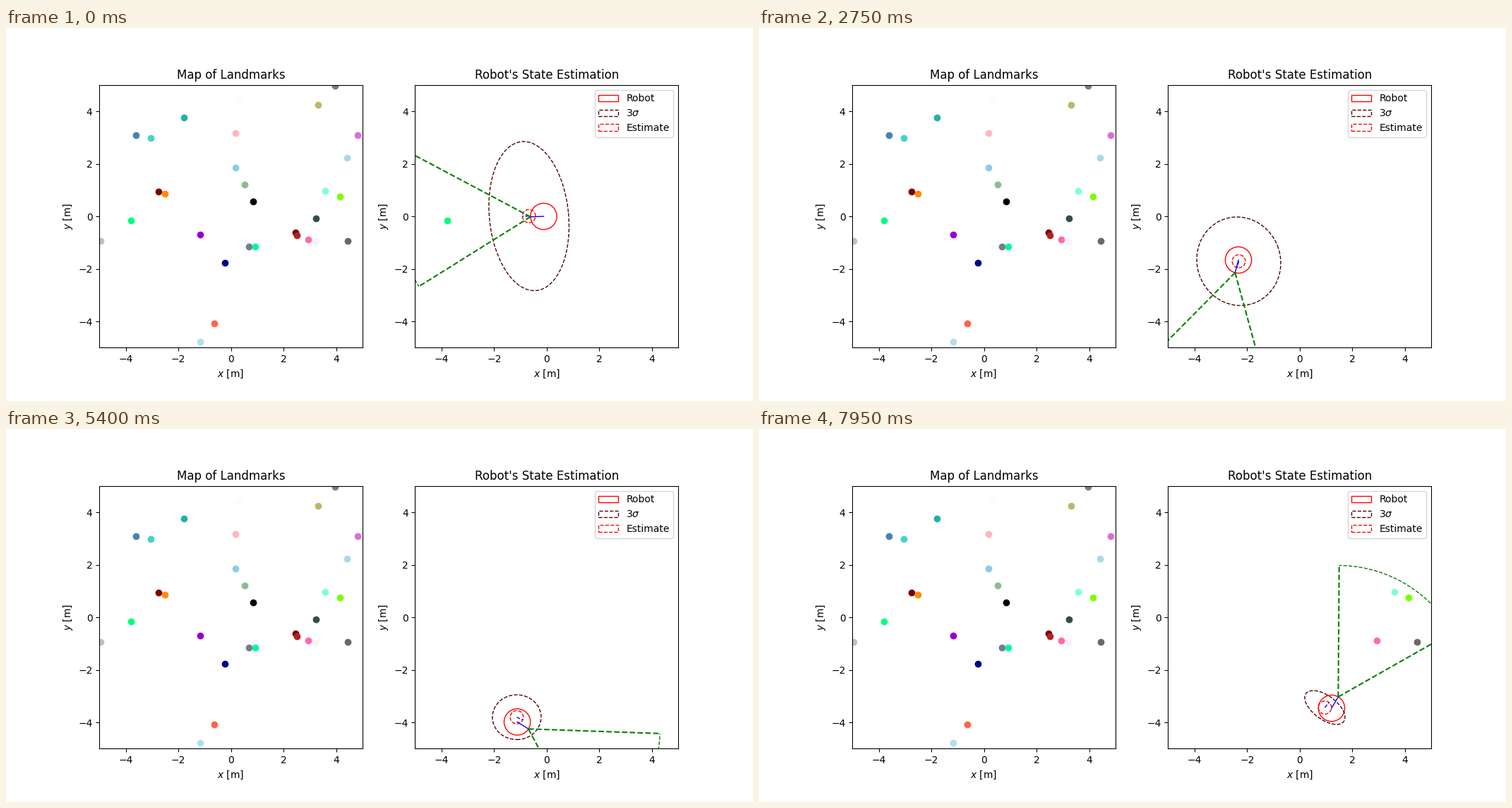
Write a matplotlib script that moves like this. It is 1058x529 px and loops after 8 s.

```python
import numpy as np
import matplotlib.pyplot as plt
from matplotlib.animation import FuncAnimation
from matplotlib.patches import Circle, Ellipse

FRAMES, INTERVAL = 160, 50
RADIUS, EST_RADIUS = 0.5, 0.25
HALF_FOV, FOV_RANGE, DETECT_RANGE = np.radians(30), 5.0, 4.7
SPEED = 0.0525  # metres per frame

LANDMARKS = [
    ("steelblue", -3.62, 3.09), ("mediumturquoise", -3.05, 2.97),
    ("lightseagreen", -1.80, 3.77), ("snow", 0.31, 4.43),
    ("lightpink", 0.17, 3.16), ("skyblue", 0.17, 1.86),
    ("darkseagreen", 0.52, 1.22), ("black", 0.83, 0.57),
    ("maroon", -2.74, 0.93), ("darkorange", -2.51, 0.86),
    ("springgreen", -3.79, -0.15), ("silver", -4.94, -0.93),
    ("darkviolet", -1.16, -0.69), ("slategray", 0.69, -1.15),
    ("mediumspringgreen", 0.92, -1.15), ("navy", -0.23, -1.77),
    ("tomato", -0.62, -4.07), ("powderblue", -1.18, -4.77),
    ("slategray", 3.95, 4.98), ("darkkhaki", 3.31, 4.24),
    ("orchid", 4.81, 3.09), ("lightblue", 4.42, 2.22),
    ("aquamarine", 3.59, 0.96), ("lawngreen", 4.14, 0.75),
    ("darkslategray", 3.24, -0.08), ("maroon", 2.46, -0.60),
    ("firebrick", 2.51, -0.72), ("hotpink", 2.93, -0.87),
    ("lavenderblush", 3.20, -0.96), ("dimgray", 4.45, -0.93),
]
DETECTABLE = {"springgreen", "tomato", "aquamarine", "lawngreen",
              "hotpink", "dimgray"}

# Waypoints: frame and true pose (x, y, heading in degrees)
STEPS = np.array([0, 33, 55, 86, 108, 137, 159])
ROBOT = np.array([
    (-0.117, 0.0, 182), (-1.753, -0.64, 227.2), (-2.33, -1.66, 255.3),
    (-2.01, -3.19, 307), (-1.12, -3.98, 328), (0.393, -4.17, 377.5),
    (1.21, -3.457, 419.6),
])
# Estimated pose at the same waypoints
ESTIMATE = np.array([
    (-0.675, 0.01, 181), (-1.775, -0.769, 227), (-2.317, -1.708, 256),
    (-2.04, -3.122, 307), (-1.139, -3.798, 335), (0.218, -4.007, 373),
    (0.956, -3.43, 410),
])
# Three-sigma half extents in x and y, and their correlation
SPREAD = np.array([
    (1.523, 2.837, -0.132), (0.865, 1.496, 0.165), (1.596, 1.684, -0.04),
    (0.973, 0.872, 0.28), (0.926, 0.852, 0.0), (1.12, 1.395, -0.14),
    (0.765, 0.644, -0.58),
])


def direction(angle):
    return np.array([np.cos(angle), np.sin(angle)])


def hermite(keys, slopes, frame):
    i = min(np.searchsorted(STEPS, frame, side="right") - 1, len(STEPS) - 2)
    span = STEPS[i + 1] - STEPS[i]
    u = (frame - STEPS[i]) / span
    return ((1 + 2 * u) * (1 - u) ** 2 * keys[i]
            + u * (1 - u) ** 2 * span * slopes[i]
            + u * u * (3 - 2 * u) * keys[i + 1]
            + u * u * (u - 1) * span * slopes[i + 1])


def linear(keys, frame):
    return np.array([np.interp(frame, STEPS, col) for col in keys.T])


ROBOT_SLOPES = np.gradient(ROBOT, STEPS, axis=0)
ROBOT_SLOPES[:, :2] = SPEED * direction(np.radians(ROBOT[:, 2])).T


def setup(ax, title):
    ax.set_aspect("equal")
    ax.set(xlim=(-5, 5), ylim=(-5, 5), title=title,
           xlabel="$x$ [m]", ylabel="$y$ [m]")


def dot(ax, color, x, y):
    return ax.plot([x], [y], "o", color=color, zorder=1.5)[0]


fig, (ax_map, ax_est) = plt.subplots(
    1, 2, figsize=(10.58 + 1e-6, 5.29 + 1e-6), dpi=100)
setup(ax_map, "Map of Landmarks")
setup(ax_est, "Robot's State Estimation")

for mark in LANDMARKS:
    dot(ax_map, *mark)
sightings = [(dot(ax_est, *mark), np.array(mark[1:]))
             for mark in LANDMARKS if mark[0] in DETECTABLE]

body = Circle((0, 0), RADIUS, fill=False, ec="red", label="Robot")
ellipse = Ellipse((0, 0), 1, 1, fill=False, ec="#500000", ls="--",
                  label=r"3$\sigma$")
est_body = Circle((0, 0), EST_RADIUS, fill=False, ec="red", ls="--",
                  label="Estimate")
for patch in (body, ellipse, est_body):
    ax_est.add_patch(patch)
nose, = ax_est.plot([], [], "b-", lw=1)
est_nose, = ax_est.plot([], [], "b--", lw=1)
rays = [ax_est.plot([], [], "--", color="green", lw=1.5)[0] for _ in range(2)]
arc, = ax_est.plot([], [], "--", color="green", lw=1)
ax_est.legend(handles=[body, ellipse, est_body], loc="upper right")


def segment(line, start, end):
    line.set_data([start[0], end[0]], [start[1], end[1]])


def place_ellipse(center, hx, hy, rho):
    cov = np.array([[hx * hx, rho * hx * hy], [rho * hx * hy, hy * hy]])
    values, vectors = np.linalg.eigh(cov)
    ellipse.set_center(center)
    ellipse.width, ellipse.height = 2 * np.sqrt(values[::-1])
    ellipse.angle = np.degrees(np.arctan2(vectors[1, 1], vectors[0, 1]))


def is_visible(point, camera, heading):
    dx, dy = point - camera
    off = (np.arctan2(dy, dx) - heading + np.pi) % (2 * np.pi) - np.pi
    return np.hypot(dx, dy) < DETECT_RANGE and abs(off) < HALF_FOV


def update(frame):
    pose = hermite(ROBOT, ROBOT_SLOPES, frame)
    est = pose + linear(ESTIMATE - ROBOT, frame)
    center, heading = pose[:2], np.radians(pose[2])
    est_center, est_heading = est[:2], np.radians(est[2])
    camera = center + RADIUS * direction(heading)

    body.set_center(center)
    est_body.set_center(est_center)
    segment(nose, center, camera)
    segment(est_nose, est_center,
            est_center + EST_RADIUS * direction(est_heading))
    place_ellipse(est_center, *linear(SPREAD, frame))

    for ray, side in zip(rays, (-HALF_FOV, HALF_FOV)):
        segment(ray, camera, camera + FOV_RANGE * direction(heading + side))
    sweep = np.linspace(heading - HALF_FOV, heading + HALF_FOV, 60)
    arc.set_data(*(camera[:, None] + FOV_RANGE * direction(sweep)))

    for marker, point in sightings:
        marker.set_visible(is_visible(point, camera, heading))
    return [body, ellipse, est_body, nose, est_nose, arc, *rays]


anim = FuncAnimation(fig, update, frames=FRAMES, interval=INTERVAL,
                     repeat=True, repeat_delay=0,
                     init_func=lambda: update(0))
plt.show()
```
